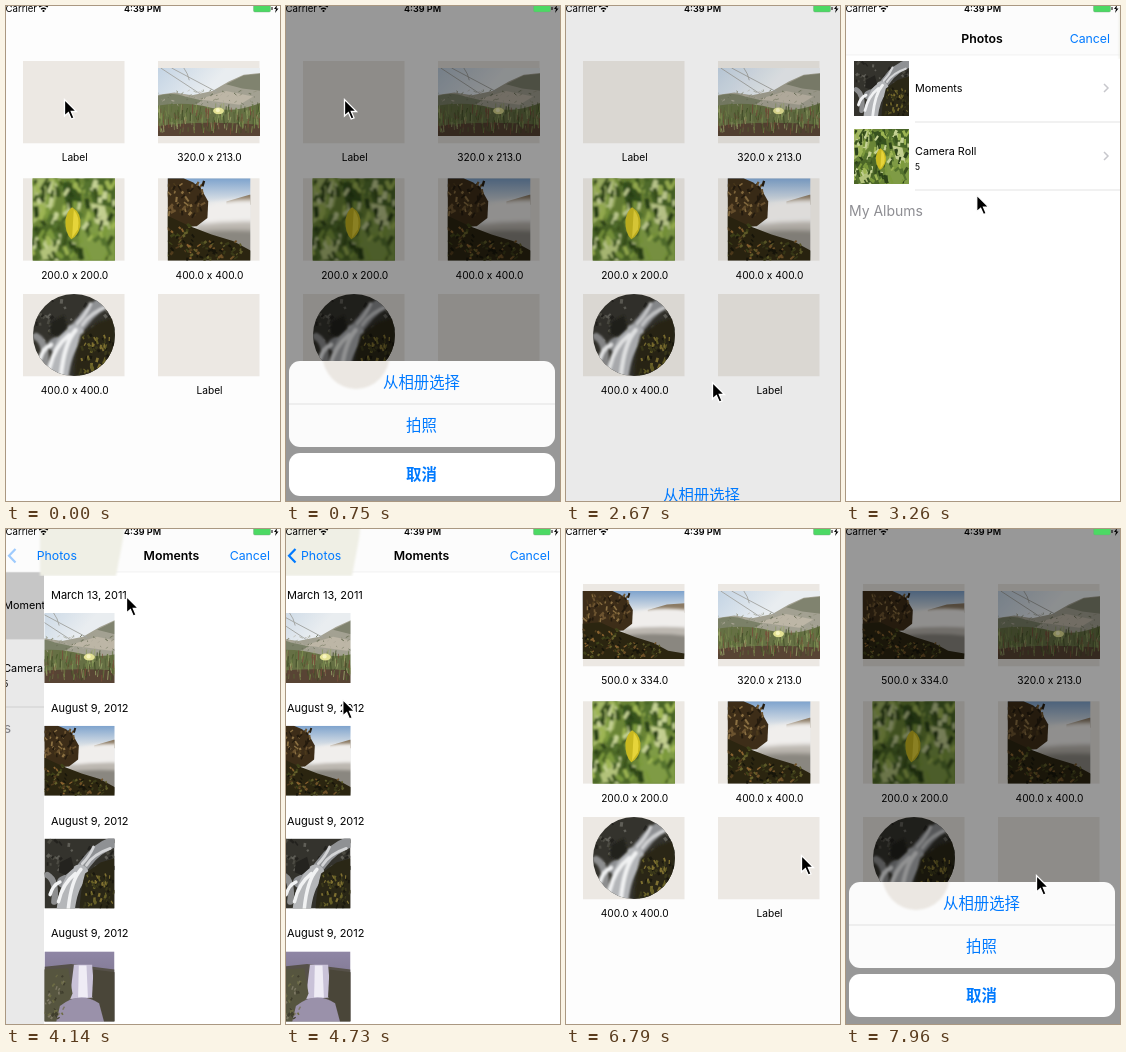
An HTML page for the animation above (8 s loop, 274x495 px).

```html
<!DOCTYPE html>
<html lang="en">
<head>
<meta charset="utf-8">
<title>Choosing a photo</title>
<style>
  html, body { margin: 0; width: 100%; height: 100%; overflow: hidden; background: #fdfdfd; }
  svg { display: block; }
  #stage { width: 274px; height: 495px; font-family: Inter, "Noto Sans", sans-serif; }
  .label { font-size: 10.2px; text-anchor: middle; }
  .date { font-size: 11px; }
  .bar { font-size: 12.3px; }
  .title { font-weight: 600; text-anchor: middle; }
  .blue { fill: #007aff; }
  .row { font-size: 10.8px; }
  .action { font: 15.4px "Noto Sans CJK SC", "Noto Sans CJK", "Noto Sans CJK JP", sans-serif; text-anchor: middle; fill: #007aff; }
  .strong { font-weight: 700; }
</style>
</head>
<body>
<svg id="stage" viewBox="0 0 274 495">
  <defs>
    <filter id="soft" x="-30%" y="-30%" width="160%" height="160%"><feGaussianBlur stdDeviation="1"/></filter>
    <filter id="mist" x="-30%" y="-30%" width="160%" height="160%"><feGaussianBlur stdDeviation="2.5"/></filter>
    <linearGradient id="sky" x2="0" y2="1"><stop stop-color="#7ea3cd"/><stop offset=".3" stop-color="#e3e6e8"/></linearGradient>
    <linearGradient id="haze" x2="1" y2=".6"><stop stop-color="#c4d4e4"/><stop offset=".5" stop-color="#e9edf0"/></linearGradient>
    <linearGradient id="dusk" x2="0" y2="1"><stop stop-color="#8f86a5"/><stop offset="1" stop-color="#6c6678"/></linearGradient>
    <clipPath id="round"><circle cx="68" cy="329" r="41"/></clipPath>
    <clipPath id="plateClip"><rect x="3" y="353" width="266" height="86" rx="11"/></clipPath>
    <clipPath id="navClip"><rect x="-10" y="-5" width="290" height="52"/></clipPath>

    <symbol id="dunes" viewBox="0 0 150 100" preserveAspectRatio="xMidYMid slice">
      <rect width="150" height="100" fill="url(#haze)"/>
      <g filter="url(#soft)">
        <path d="M-4 40L24 36 50 40 80 34 104 20 126 10 154 7V104H-4Z" fill="#a3a192"/>
        <path d="M100 24L126 11 154 8V34L124 30Z" fill="#80836f"/>
        <path d="M-4 42Q20 34 40 42L66 48 40 60 -4 58Z" fill="#7b8168"/>
        <path d="M60 46L100 34 140 42 120 54Z" fill="#bdb6a6"/>
        <path d="M-4 56Q40 48 76 58T154 50V104H-4Z" fill="#667044"/>
        <path d="M-4 86Q60 76 154 84V104H-4Z" fill="#584434"/>
      </g>
      <g data-flecks="23,70,0,34,150,22,5,3,1" data-colors="#6f745c #b0ab9b #8d8e78"/>
      <g stroke-opacity=".8" data-flecks="7,190,0,64,150,34,2,15,1" data-colors="#7f9150 #3f4b26 #9aa56b #7a4c3a #566b34"/>
      <path d="M4 0L62 38M20 0L86 35M38 0Q44 8 46 18" fill="none" stroke="#a2a4a0" stroke-width="1.3"/>
      <ellipse cx="89" cy="63" rx="8" ry="5" fill="#e4e294"/>
      <circle cx="88" cy="62" r="3" fill="#f8f5c0"/>
    </symbol>

    <symbol id="falls" viewBox="0 0 150 100" preserveAspectRatio="xMidYMid slice">
      <rect width="150" height="100" fill="url(#sky)"/>
      <path d="M96 28L124 20 150 18V32H96Z" fill="#8b7a63"/>
      <g filter="url(#mist)">
        <path d="M72 32Q110 22 156 28V60H68Z" fill="#f0eeec"/>
        <path d="M60 56Q110 50 156 54V72H56Z" fill="#bcb7b0"/>
        <path d="M56 65Q110 60 156 66V96H56Z" fill="#8a8780"/>
      </g>
      <path d="M0 0H44L56 5 66 14 74 28 73 48 60 58 0 62Z" fill="#3d2d18"/>
      <g data-flecks="31,75,4,9,64,40,6,7,2" data-colors="#6d5430 #241b0e #8b7042 #4c3a1c"/>
      <path d="M0 48L26 46 52 58 78 68 104 76 126 88 150 92V100H0Z" fill="#2b2510"/>
      <g data-flecks="3,70,0,58,62,42,5,4,2" data-colors="#65602a #3f4219 #8a6330 #17150a #523d1d"/>
      <g data-flecks="13,45,58,78,60,22,5,4,2" data-colors="#5d5a28 #3a3a18 #705228 #17150a"/>
    </symbol>

    <symbol id="leaf" viewBox="0 0 100 100" preserveAspectRatio="xMidYMid slice">
      <rect width="100" height="100" fill="#6a8536"/>
      <g filter="url(#soft)">
        <path d="M0 0H34L26 34 0 56Z" fill="#a3b766"/>
        <path d="M62 0H100V36L74 30Z" fill="#476427"/>
        <path d="M0 62L38 48 46 100H0Z" fill="#4b6627"/>
        <path d="M58 50L100 40V100H56Z" fill="#7f9b45"/>
        <path d="M36 6L56 0 60 34 42 38Z" fill="#36521f"/>
        <path d="M70 30L88 34 94 62 76 54Z" fill="#c2ce8f"/>
        <path d="M10 76L34 70 28 96 8 100Z" fill="#b2c27a"/>
        <g data-flecks="11,130,0,8,100,96,9,15,4" data-colors="#9db553 #2c4318 #c5d294 #55732e #7c9a3c #3a531f"/>
      </g>
      <path d="M48 35Q60 42 58 58 55 70 47 74 39 66 40 50 42 39 48 35Z" fill="#c9b920"/>
      <path d="M50 38Q58 46 55 62L48 72Z" fill="#e6d43a"/>
    </symbol>

    <symbol id="stream" viewBox="0 0 100 100" preserveAspectRatio="xMidYMid slice">
      <rect width="100" height="100" fill="#34332d"/>
      <g data-flecks="17,45,0,6,100,60,6,6,3" data-colors="#4c4b43 #23221e #605f58"/>
      <g fill="none" stroke-linecap="round" filter="url(#soft)">
        <path d="M100 4Q74 14 60 34T26 62" stroke="#8f9194" stroke-width="16"/>
        <path d="M50 50Q34 66 30 104" stroke="#b4b6b9" stroke-width="26"/>
        <path d="M4 52Q18 60 14 90" stroke="#8d8e8f" stroke-width="9"/>
        <path d="M94 14Q70 22 60 38M70 12Q64 26 54 36" stroke="#d3d4d6" stroke-width="4"/>
        <path d="M52 44Q38 60 34 100M44 50Q26 64 20 90M22 62Q12 66 8 80" stroke="#f1f2f3" stroke-width="5"/>
      </g>
      <path d="M22 34L38 26 42 42 30 52 20 48Z" fill="#24231f" filter="url(#soft)"/>
      <path d="M58 50L80 34 100 28V100H50Q52 70 58 50Z" fill="#2a2716" filter="url(#soft)"/>
      <g data-flecks="5,70,56,52,42,48,3,6,2" data-colors="#676027 #3b391a #7f7031 #1a180e"/>
    </symbol>

    <symbol id="gorge" viewBox="0 0 100 100" preserveAspectRatio="xMidYMid slice">
      <rect width="100" height="100" fill="url(#dusk)"/>
      <path d="M0 22L38 18 100 26V100H0Z" fill="#565149"/>
      <g filter="url(#soft)">
        <path d="M42 19H68L72 66 36 68Z" fill="#c9c2d8"/>
        <path d="M49 20H60L62 66H48Z" fill="#efecf5"/>
        <path d="M-4 26L34 24 40 60 22 104H-4Z" fill="#56553f"/>
        <path d="M70 26L104 30V104H80L68 64Z" fill="#4a4639"/>
        <path d="M22 78Q50 56 78 74L86 104H16Z" fill="#9a91aa"/>
      </g>
      <g data-flecks="9,40,0,34,28,64,4,5,2" data-colors="#6d6c45 #3f3d2d #7c7763"/>
    </symbol>
  </defs>

  <rect width="274" height="495" fill="#fdfdfd"/>
  <g id="grid"></g>

  <g id="picker">
    <rect x="-6" y="-5" width="290" height="520" fill="#fff"/>
    <g id="albums">
      <rect id="pressed" x="-6" y="43" width="290" height="67" fill="#d9d9d9"/>
      <use href="#stream" x="8" y="49" width="55" height="55"/>
      <use href="#leaf" x="8" y="117" width="55" height="55"/>
      <path d="M69 110H284M69 178H284" stroke="#dcdcdc" stroke-width=".8"/>
      <path d="M258 72l4 4-4 4M258 140l4 4-4 4" fill="none" stroke="#c7c7cc" stroke-width="1.5"/>
      <text class="row" x="69" y="80">Moments</text>
      <text class="row" x="69" y="143">Camera Roll</text>
      <text x="69" y="158" font-size="8.5">5</text>
      <text x="77" y="204" font-size="14" text-anchor="end" fill="#8e8e93">My Albums</text>
    </g>
    <rect id="shade" x="-6" y="43" width="290" height="470"/>
    <g id="moments"><rect x="-6" y="43" width="300" height="470" fill="#fff"/></g>
    <rect x="-6" y="-5" width="290" height="48" fill="#fcfcfc"/>
    <path d="M-6 43H284" stroke="#ececec" stroke-width=".7"/>
    <g clip-path="url(#navClip)"><path id="glow" d="M-10-20H74Q75-4 73 10L66 47H-10Z" fill="#efefe5" filter="url(#soft)"/></g>
    <path id="back" d="M9.5 20L3 26.8 9.5 33.6" fill="none" stroke="#007aff" stroke-width="2.2"/>
    <g id="backTitle">
      <text id="backBold" class="bar title" x="20" y="31">Photos</text>
      <text id="backLink" class="bar blue" y="31">Photos</text>
    </g>
    <text id="heading" class="bar title" x="135.5" y="31">Moments</text>
    <text class="bar blue" x="264" y="31" text-anchor="end">Cancel</text>
  </g>

  <rect id="dim" width="274" height="495"/>

  <g id="sheet">
    <g id="plates" fill="#fbfbfb">
      <rect x="3" y="353" width="266" height="86" rx="11"/>
      <ellipse cx="70" cy="345" rx="34" ry="36" fill="#ebe7e2" filter="url(#soft)" clip-path="url(#plateClip)"/>
      <path d="M3 396H269" stroke="#dadada" stroke-width=".8"/>
      <rect x="3" y="445" width="266" height="43" rx="11" fill="#fff"/>
    </g>
    <text class="action" x="135.5" y="380">从相册选择</text>
    <text class="action" x="135.5" y="423">拍照</text>
    <text class="action strong" x="135.5" y="472">取消</text>
  </g>

  <g id="status">
    <text x="31" y="6" font-size="9.6" text-anchor="end">Carrier</text>
    <path d="M33.2 1Q37.5-2.500 41.800 1M35 3.200Q37.500 1.200 40 3.200" fill="none" stroke="#000" stroke-width="1.4"/>
    <circle cx="37.5" cy="5" r="1.1"/>
    <text x="136.5" y="6" font-size="9.1" font-weight="600" text-anchor="middle">4:39 PM</text>
    <rect x="247.5" y="-1.5" width="17" height="7.5" rx="1.5" fill="#4cd964" stroke="#7d9a82" stroke-width=".4"/>
    <path d="M265.5 1h1v3h-1ZM271-1l-3 4h2l-1 4 3.5-4.500h-2Z"/>
  </g>

  <path id="cursor" d="M-.500-.500V16L3.400 12.600 6.200 19 9 17.800 6.300 11.500H11.500Z" stroke="#fff" stroke-width="1.3"/>
</svg>

<script>
const $ = id => document.getElementById(id);

function random(seed) {
  return () => (seed = seed * 16807 % 2147483647) / 2147483647;
}

// Scatter short strokes for grass, moss and foliage.
for (const group of document.querySelectorAll("[data-flecks]")) {
  const [seed, count, x, y, w, h, dx, dy, weight] = group.dataset.flecks.split(",").map(Number);
  const colors = group.dataset.colors.split(" ");
  const next = random(seed * 7919);
  let strokes = "";
  for (let i = 0; i < count; i++) {
    const px = x + next() * w, py = y + next() * h;
    const sx = (next() - .5) * 2 * dx, sy = -dy * (.4 + next() * .6);
    strokes += `<path d="M${px} ${py}l${sx} ${sy}" stroke="${colors[i % colors.length]}" stroke-width="${weight * (.7 + next())}"/>`;
  }
  group.innerHTML = strokes;
}

const photo = (id, x, y, w, h = w) => `<use href="#${id}" x="${x}" y="${y}" width="${w}" height="${h}"/>`;

function cell(col, row, text, picture = "", id = "") {
  const x = [17, 152][col], y = [55, 172.3, 288][row];
  return `<g id="${id}"><rect x="${x}" y="${y}" width="101.5" height="82.3" fill="#ece8e3"/>${picture}
    <text class="label" x="${[68.7, 203.5][col]}" y="${[155, 272.7, 387.7][row]}">${text}</text></g>`;
}

$("grid").innerHTML =
  cell(0, 0, "Label", "", "empty") +
  cell(0, 0, "500.0 x 334.0", photo("falls", 16.5, 62, 102, 68), "chosen") +
  cell(1, 0, "320.0 x 213.0", photo("dunes", 152, 62, 102, 68)) +
  cell(0, 1, "200.0 x 200.0", photo("leaf", 26.5, 172.3, 82.5)) +
  cell(1, 1, "400.0 x 400.0", photo("falls", 161.8, 172.3, 82.5)) +
  cell(0, 2, "400.0 x 400.0", `<g clip-path="url(#round)">${photo("stream", 27, 288, 82)}</g>`) +
  cell(1, 2, "Label");

[["March 13, 2011", "dunes"], ["August 9, 2012", "falls"], ["August 9, 2012", "stream"], ["August 9, 2012", "gorge"]]
  .forEach(([date, id], i) => {
    const y = i * 112.8;
    $("moments").innerHTML += `<text class="date" x="1" y="${y + 70}">${date}</text>` + photo(id, -5.5, y + 84, 70);
  });

const LOOP = 8000, FIRST = 597, TICK = 147.26, WIDTH = 283;

const tracks = {
  sheet: [[-1, 142], [0, 60], [1, 2], [2, 0], [13, 0], [14, 115], [15, 145], [45, 145], [46, 60], [47, 2], [48, 0]],
  dim: [[-1, 0], [0, .25], [1, .4], [13, .4], [14, .075], [15, 0], [45, 0], [46, .25], [47, .4]],
  picker: [[15, 506], [16, 260], [17, 50], [18, 6], [19, 0], [32, 0], [33, 120], [34, 382], [35, 480], [36, 506]],
  push: [[22, WIDTH], [23, 190], [24, 44], [25, 5], [26, 0]],
  cursor: [[1, 59, 94], [7, 144, 377], [8, 147, 377], [14, 147, 377], [21, 121, 68], [24, 121, 68], [30, 35, 207],
    [33, 35, 207], [34, 54, 201], [41, 237, 315], [42, 236, 327], [44, 191, 347]]
};

function at(track, tick) {
  const i = track.findIndex(key => key[0] >= tick);
  if (i < 0) return track[track.length - 1].slice(1);
  if (i === 0) return track[0].slice(1);
  const from = track[i - 1], to = track[i];
  const u = (tick - from[0]) / (to[0] - from[0]);
  const eased = u * u * (3 - 2 * u);
  return from.slice(1).map((v, n) => v + (to[n + 1] - v) * eased);
}

const move = (id, x, y) => $(id).setAttribute("transform", `translate(${x} ${y})`);
const fade = (id, opacity) => $(id).setAttribute("opacity", Math.max(0, Math.min(1, opacity)));

function draw(time) {
  const tick = Math.max(-1, Math.floor((time - FIRST) / TICK));
  const value = name => at(tracks[name], tick)[0];
  const push = value("push"), dim = value("dim"), remaining = push / WIDTH;

  fade("empty", tick < 33);
  fade("chosen", tick >= 33);

  move("picker", 0, value("picker"));
  move("moments", push, 0);
  move("glow", push, 0);
  move("albums", -85 * (1 - remaining), 0);
  fade("pressed", tick >= 23);
  fade("shade", .1 * (1 - remaining));
  move("backTitle", 15 + 101 * remaining, 0);
  fade("backBold", remaining * 2 - 1);
  fade("backLink", 2 - remaining * 2);
  fade("back", 1 - push / 70);
  move("heading", push * .68, 0);
  fade("heading", 1.2 - remaining * 1.2);

  fade("dim", dim);
  move("sheet", 0, value("sheet"));
  fade("plates", (dim - .075) * 8);
  move("cursor", ...at(tracks.cursor, tick));
}

const start = performance.now();
function frame() {
  draw((performance.now() - start) % LOOP);
  requestAnimationFrame(frame);
}
frame();
</script>
</body>
</html>
```
